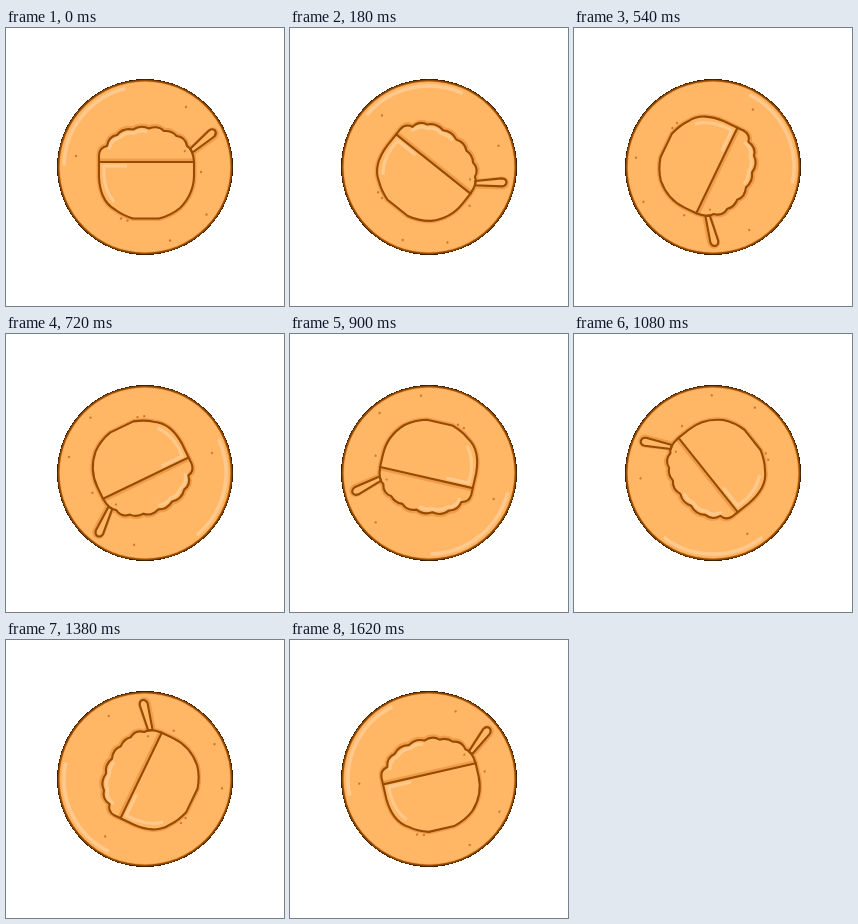
Recreate the animation shown at these times as an HTML page. Size 278 px wide and 278 px high, loop 1680 ms.

```html
<!DOCTYPE html>
<html lang="en">
<head>
<meta charset="utf-8">
<title>Rolling rice bowl coin</title>
<style>
html, body { margin: 0; width: 100%; height: 100%; overflow: hidden; background: #fff; }
svg { display: block; width: 100vw; height: 100vh; }
.line { fill: none; stroke: #964b00; stroke-width: 2.1; stroke-linecap: round; stroke-linejoin: round; }
.shade { fill: none; stroke: #f09c49; stroke-width: 5; stroke-linejoin: round; }
.glow { fill: none; stroke: #ffc98d; stroke-linejoin: round; }
</style>
</head>
<body>
<svg viewBox="0 0 278 278">
  <defs>
    <path id="rice" d="M93 134V127Q93.500 119.500 101 118Q102.500 108.500 111 107Q117 99.500 127 101.500Q135 96.500 143 100.500Q152 97 158 103Q166 102.500 170.500 108Q179.500 109 181 118Q187 121 188 134"/>
    <path id="bowl" d="M93 134V149Q93.500 160 97 168Q101 177 109 181.500Q116 187 127 190.500H153Q165 187.500 174 180C183 171 188 159 188 147V134Z"/>
    <path id="spoon" d="M184 121L203 102.500Q206.500 100 209 102.500Q211 105.500 208.300 108.500L186.500 124.500Z"/>
  </defs>
  <circle cx="139" cy="139" r="88" fill="#3c1e00" shape-rendering="crispEdges"/>
  <circle cx="139" cy="139" r="87.300" fill="#964b00"/>
  <circle cx="139" cy="139" r="85.700" fill="#f09c49"/>
  <circle cx="139" cy="139" r="84.900" fill="#ffb765"/>
  <g id="face">
    <path class="glow" id="shine" stroke-width="3.600"/>
    <g id="specks" fill="#d07a28"></g>
    <g class="shade">
      <use href="#rice" y="-.8"/>
      <use href="#bowl"/>
      <use href="#spoon" x=".5" y=".5"/>
    </g>
    <g fill="#ffb765">
      <use href="#rice"/>
      <use href="#bowl"/>
      <use href="#spoon"/>
    </g>
    <path d="M94 131.800H187" stroke="#f09c49" stroke-width="2.400"/>
    <g class="glow" stroke-width="3.200">
      <path d="M103 121.500Q105 111.500 113.500 110Q119 104 128 105Q135 101.500 141 104"/>
      <path d="M121 138H98V148Q99 163 108 174"/>
    </g>
    <circle cx="178.800" cy="123.200" r="1.100" fill="#d07a28"/>
    <g class="line">
      <use href="#rice"/>
      <use href="#bowl"/>
      <use href="#spoon"/>
    </g>
  </g>
</svg>
<script>
const CENTER = 139, STEP = 60, STEPS = 28;
const byId = id => document.getElementById(id);
const face = byId('face');

function rim(radius, degrees) {
  const a = degrees * Math.PI / 180;
  return [CENTER + radius * Math.cos(a), CENTER + radius * Math.sin(a)].join(' ');
}
byId('shine').setAttribute('d', `M${rim(81, 181)}A81 81 0 0 1 ${rim(81, 256)}`);

const specks = [[180, 79], [70, 128], [195, 144], [200.5, 186.5], [164, 212.5], [115, 190.5], [121.5, 192.5]];
byId('specks').innerHTML = specks
  .map(([x, y]) => `<circle cx="${x}" cy="${y}" r="1.2"/>`).join('');

function draw(time) {
  const step = Math.floor(time / STEP) % STEPS;
  face.setAttribute('transform', `rotate(${step * 360 / STEPS} ${CENTER} ${CENTER})`);
}

let start;
function tick(now) {
  start ??= now;
  draw(Math.max(0, now - start));
  requestAnimationFrame(tick);
}
draw(0);
requestAnimationFrame(tick);
</script>
</body>
</html>
```
